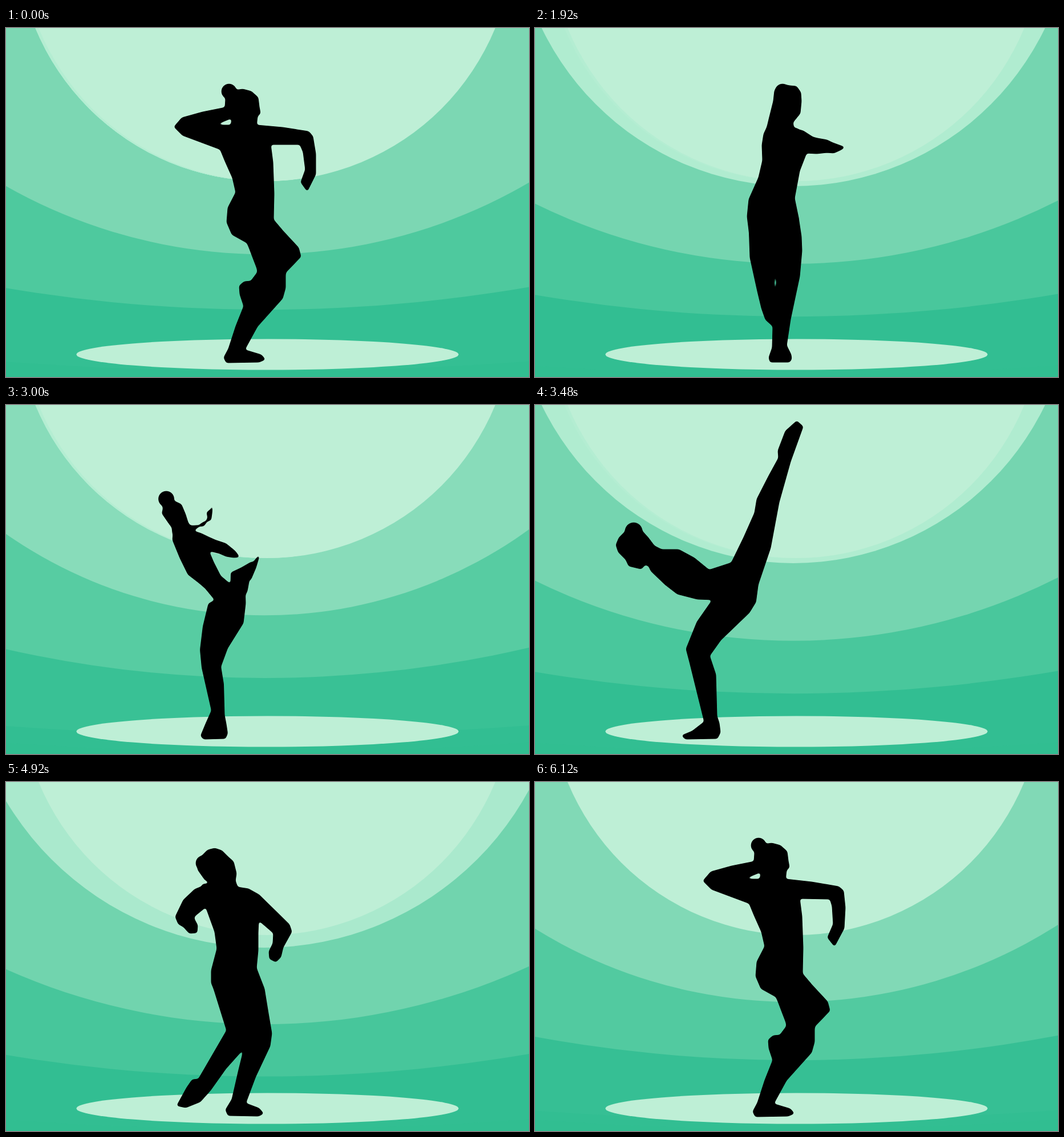
These frames come from a looping animation (917x611 px, 6.24 s). An HTML page without scripts:

```html
<!DOCTYPE html>
<html lang="en">
<head>
<meta charset="utf-8">
<title>Dancer on stage</title>
<style>
@property --u { syntax: "<number>"; inherits: true; initial-value: 0.935; }

html, body { margin: 0; width: 100%; height: 100%; overflow: hidden; background: #31be91; }
svg { display: block; width: 917px; height: 611px; animation: grow 6240ms infinite; }

/* --u counts emitted rings; each ring has its own age --p */
@keyframes grow {
  0% { --u: .935; animation-timing-function: steps(8) }
  15.385% { --u: 1.46; animation-timing-function: steps(8) }
  30.769% { --u: 2.065; animation-timing-function: steps(5) }
  40.385% { --u: 2.4; animation-timing-function: steps(8) }
  55.769% { --u: 3.065; animation-timing-function: steps(12) }
  78.846% { --u: 4.16; animation-timing-function: steps(10) }
  98.077% { --u: 4.855; animation-timing-function: steps(1) }
  100% { --u: 4.935 }
}

.ring {
  --p: calc(var(--u) - var(--born));
  --c1: clamp(0, var(--p), 1);
  --c2: clamp(0, var(--p) - 1, 1);
  --c3: clamp(0, var(--p) - 2, 1);
  --bottom: calc(268 + 137 * var(--c1) + 120 * clamp(0, var(--p) - 1, .4)
    + 75 * clamp(0, var(--p) - 1.4, .6) + 110 * var(--c3));
  --bend: calc(2.3 - 4 * clamp(0, var(--p), .07) - 1.4 * clamp(0, var(--p) - .07, .33)
    - .88 * clamp(0, var(--p) - .4, .7) - .72 * clamp(0, var(--p) - 1.1, .8)
    - .6 * clamp(0, var(--p) - 2.16, .34));
  --size: calc(1000px / var(--bend));
  cx: 453px;
  cy: calc(1px * var(--bottom) - var(--size));
  r: var(--size);
  fill: rgb(calc(180 - 60 * var(--c1) - 45 * var(--c2) - 25 * var(--c3)),
    calc(237 - 23 * var(--c1) - 14 * var(--c2) - 10 * var(--c3)),
    calc(210 - 33 * var(--c1) - 20 * var(--c2) - 11 * var(--c3)));
}

.light { fill: #beefd6; }
.dancer { stroke: #000; stroke-width: 3; stroke-linejoin: round; filter: url(#smooth); }
.dancer > * { animation: 6240ms infinite; }
.bun { animation-name: bun !important; }
.head { animation-name: head !important; }
.torso { animation-name: torso !important; }
.back-arm { animation-name: back-arm !important; }
.front-arm { animation-name: front-arm !important; }
.standing { animation-name: standing !important; }
.free { animation-name: free !important; }

@keyframes bun {
  0% { cx: 391px; cy: 111px; r: 12px; animation-timing-function: steps(8) }
  15.385% { cx: 372px; cy: 130px; r: 12px; animation-timing-function: steps(8) }
  30.769% { cx: 434px; cy: 111px; r: 12px; animation-timing-function: steps(5) }
  40.385% { cx: 389px; cy: 108px; r: 11px; animation-timing-function: steps(8) }
  55.769% { cx: 173px; cy: 221px; r: 14px; animation-timing-function: steps(12) }
  78.846% { cx: 346px; cy: 142px; r: 12px; animation-timing-function: steps(10) }
  98.077%, 100% { cx: 392px; cy: 111px; r: 12px }
}
@keyframes head {
  0%, 98.077%, 100% { d: path("M386 124 402 110 415 108 430 112 441 122 443 138 445 149 440 154 438 172 395 172 397 160 385 140Z"); animation-timing-function: steps(8) }
  15.385% { d: path("M378 120 391 110 406 108 420 112 430 123 431 138 435 147 433 168 422 175 390 180 390 168 377 146Z"); animation-timing-function: steps(8) }
  30.769% { d: path("M421 110 434 100 447 102 458 103 465 113 466 128 464 149 451 165 453 176 405 185 411 160 419 128Z"); animation-timing-function: steps(5) }
  40.385% { d: path("M384 98 393 93 404 90 416 94 424 102 426 114 428 130 430 150 428 166 386 168 391 150 383 122Z"); animation-timing-function: steps(8) }
  55.769% { d: path("M165 281 160 270 147 257 143 245 148 233 159 222 185 219 197 232 209 248 200 281 193 278 186 286Z"); animation-timing-function: steps(12) }
  78.846% { d: path("M346 128 354 120 366 117 378 121 387 130 398 140 403 160 401 173 405 184 364 180 349 170 337 153Z"); animation-timing-function: steps(10) }
}
@keyframes torso {
  0%, 98.077%, 100% { d: path("M396 170 440 171 463 204 467 235 469 290 468 336 445 380 424 376 397 361 388 340 390 315 404 288 398 262 385 233 376 211Z"); animation-timing-function: steps(8) }
  15.385% { d: path("M390 181 440 174 456 198 467 225 467 275 457 333 455 380 404 372 386 360 378 340 382 315 398 289 400 266 386 244 372 190Z"); animation-timing-function: steps(8) }
  30.769% { d: path("M411 167 460 177 475 219 463 250 454 298 461 332 462 365 420 370 378 370 373 330 376 300 393 262 400 232 399 205 402 186Z"); animation-timing-function: steps(5) }
  40.385% { d: path("M389 158 430 167 453 208 450 240 449 285 446 310 450 360 399 356 388 345 383 320 387 300 394 283 390 262 383 220 382 182Z"); animation-timing-function: steps(8) }
  55.769% { d: path("M200 281 206 246 222 254 252 254 278 268 305 290 345 277 390 315 386 345 350 360 313 340 285 339 250 330 228 313 204 290Z"); animation-timing-function: steps(12) }
  78.846% { d: path("M362 178 425 188 442 240 441 265 441 295 438 326 452 370 400 380 372 377 361 352 361 330 371 292 367 262 351 218 345 180Z"); animation-timing-function: steps(10) }
}
@keyframes back-arm {
  0%, 98.077%, 100% { d: path("M400 171 380 171 363 170 380 163 397 156 392 145 385 140 345 148 309 158 296 173 310 187 377 212Z"); animation-timing-function: steps(8) }
  15.385% { d: path("M390 181 367 200 348 270 332 289 317 311 290 321 282 338 310 335 330 320 363 295 375 275 386 245Z"); animation-timing-function: steps(8) }
  30.769% { d: path("M410 185 415 200 420 215 425 225 430 235 435 245 430 248 425 240 418 230 412 220 405 215 403 200Z"); animation-timing-function: steps(5) }
  40.385% { d: path("M428 165 453 137 462 121 455 95 447 67 432 55 426 57 440 78 441 98 442 117 429 129 415 140Z"); animation-timing-function: steps(8) }
  55.769% { d: path("M225 275 240 275 255 280 265 285 275 290 290 310 280 320 270 318 260 312 250 305 235 295 225 285Z"); animation-timing-function: steps(12) }
  78.846% { d: path("M358 178 331 189 312 207 298 236 303 248 312 253 322 264 334 263 335 251 329 240 329 235 351 217Z"); animation-timing-function: steps(10) }
}
@keyframes front-arm {
  0%, 100% { d: path("M440 171 485 175 530 182 537 190 542 220 542 256 528 284 518 270 526 248 522 217 516 203 463 203Z"); animation-timing-function: steps(8) }
  15.385% { d: path("M440 178 448 190 454 205 455 210 452 220 450 230 445 240 440 230 442 215 442 205 440 195 430 200Z"); animation-timing-function: steps(8) }
  30.769% { d: path("M455 177 470 181 487 192 495 194 512 197 522 202 541 209 535 213 524 218 512 217 494 219 475 218Z"); animation-timing-function: steps(5) }
  40.385% { d: path("M428 167 445 177 455 184 472 191 495 197 512 203 535 211 528 214 512 216 497 212 470 212 453 207Z"); animation-timing-function: steps(8) }
  55.769% { d: path("M225 275 240 275 255 280 265 285 275 290 290 310 280 320 270 318 260 312 250 305 235 295 225 285Z"); animation-timing-function: steps(12) }
  78.846% { d: path("M425 188 443 198 496 250 500 262 485 289 481 306 473 314 463 309 462 297 469 283 470 264 442 240Z"); animation-timing-function: steps(10) }
  98.077% { d: path("M440 171 485 176 532 184 540 191 543 220 541 256 525 286 514 272 524 249 522 217 518 204 463 203Z"); animation-timing-function: steps(1) }
}
@keyframes standing {
  0%, 98.077%, 100% { d: path("M468 336 482 385 489 428 489 455 484 473 440 522 417 564 447 573 453 580 444 584 387 585 383 577 391 562 404 522 418 487 443 426 433 400 424 376Z"); animation-timing-function: steps(8) }
  15.385% { d: path("M457 333 472 385 478 410 489 455 489 471 450 515 417 564 446 573 451 579 443 584 388 585 384 576 391 562 405 530 421 491 449 453 428 417 404 372Z"); animation-timing-function: steps(8) }
  30.769% { d: path("M461 332 466 365 467 390 463 435 457 463 447 510 440 556 448 572 449 579 446 584 413 584 411 577 417 560 418 522 422 467 425 445 421 420 421 405Z"); animation-timing-function: steps(5) }
  40.385% { d: path("M446 312 452 350 455 400 450 440 446 477 445 505 446 541 448 560 451 577 449 583 430 584 426 579 426 545 425 515 417 470 417 430 408 395 399 357Z"); animation-timing-function: steps(8) }
  55.769% { d: path("M390 315 386 345 375 363 325 411 305 439 316 472 318 545 322 557 324 573 319 583 264 584 259 579 276 572 298 555 272 450 266 427 285 380 313 340Z"); animation-timing-function: steps(12) }
  78.846% { d: path("M438 326 452 362 459 405 465 440 462 462 437 515 419 563 443 572 450 580 443 584 390 583 386 574 397 556 408 508 419 463 410 440 390 420 380 380Z"); animation-timing-function: steps(10) }
}
@keyframes free {
  0%, 98.077%, 100% { d: path("M468 336 485 356 512 385 516 400 490 427 480 460 418 487 411 466 410 452 418 445 430 444 442 428 440 410 424 377Z"); animation-timing-function: steps(8) }
  15.385% { d: path("M457 334 487 345 512 357 517 370 515 430 518 490 526 537 521 543 514 541 483 498 487 488 494 485 481 389 445 380Z"); animation-timing-function: steps(8) }
  30.769% { d: path("M445 345 436 400 419 421 418 450 420 470 423 500 424 525 420 523 416 520 405 510 398 490 391 461 378 402 376 345Z"); animation-timing-function: steps(5) }
  40.385% { d: path("M446 311 461 337 474 363 479 387 475 406 446 477 430 530 420 542 409 538 411 510 408 492 417 481 417 430 399 357Z"); animation-timing-function: steps(8) }
  55.769% { d: path("M345 277 366 234 386 189 390 165 411 124 428 93 427 80 440 46 459 29 469 38 447 99 427 170 412 250 390 315Z"); animation-timing-function: steps(12) }
  78.846% { d: path("M430 340 436 400 430 445 419 463 385 501 358 539 340 559 315 569 301 566 318 535 327 522 338 521 388 435 364 358Z"); animation-timing-function: steps(10) }
}
</style>
</head>
<body>
<svg viewBox="0 0 917 611">
  <filter id="smooth" filterUnits="userSpaceOnUse" x="0" y="0" width="917" height="611">
    <feGaussianBlur stdDeviation="2"/>
    <feComponentTransfer><feFuncA type="linear" slope="6" intercept="-2.5"/></feComponentTransfer>
  </filter>

  <circle class="ring" style="--born:-2"/>
  <circle class="ring" style="--born:-1"/>
  <circle class="ring" style="--born:0"/>
  <circle class="ring" style="--born:1"/>
  <circle class="ring" style="--born:2"/>
  <circle class="ring" style="--born:3"/>
  <circle class="ring" style="--born:4"/>
  <circle class="light" cx="457.5" cy="-165" r="433"/>
  <ellipse class="light" cx="458.5" cy="571.5" rx="335" ry="27"/>

  <g class="dancer">
    <path class="free"/>
    <path class="standing"/>
    <path class="torso"/>
    <path class="back-arm"/>
    <path class="front-arm"/>
    <path class="head"/>
    <circle class="bun"/>
  </g>
</svg>
</body>
</html>
```
